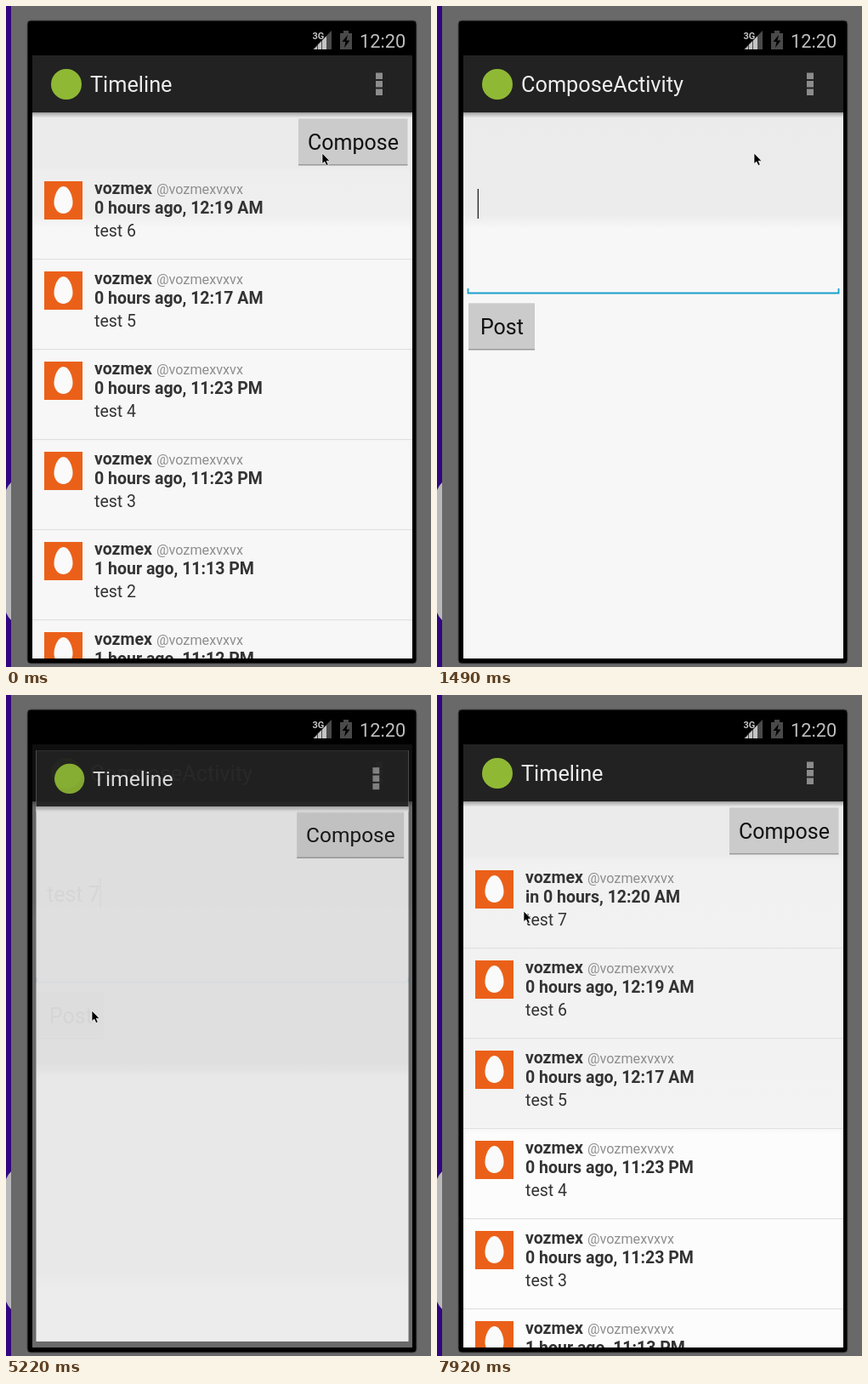
Recreate the animation shown at these times as an HTML page. Size 500x777 px, loop 8 s.

```html
<!DOCTYPE html>
<html lang="en">
<head>
<meta charset="utf-8">
<title>Timeline</title>
<style>
html, body { margin: 0; width: 100%; height: 100%; overflow: hidden; background: #696969; }
svg { display: block; width: 100%; height: 100%; }
text { font-family: Roboto, "Open Sans", sans-serif; white-space: pre; }
.title { font-size: 25.3px; fill: #eee; }
.big { font-size: 25px; fill: #101010; }
.row { font-size: 19.5px; fill: #333; }
.bold { font-weight: 700; }
.handle { font-size: 16.2px; fill: #8e8e8e; }
</style>
</head>
<body>
<svg id="stage" viewBox="0 0 500 777"></svg>
<script>
const LOOP = 8000;
const MESSAGE = 'test 7';
const $ = id => document.getElementById(id);

const rect = (x, y, w, h, fill, extra = '') =>
  `<rect x="${x}" y="${y}" width="${w}" height="${h}" fill="${fill}" ${extra}/>`;
const text = (x, y, cls, str, extra = '') =>
  `<text x="${x}" y="${y}" class="${cls}" ${extra}>${str}</text>`;

// Screen background with colour stops placed at stage heights
function background(id, stops) {
  const marks = stops.map(([y, c]) => `<stop offset="${(y - 58) / 709}" stop-color="${c}"/>`).join('');
  return `<linearGradient id="${id}" gradientUnits="userSpaceOnUse" x1="0" y1="58" x2="0" y2="767">${marks}</linearGradient>`
    + rect(31, 58, 447, 709, `url(#${id})`);
}

const actionBar = title =>
  rect(31, 58, 447, 67.5, '#222') +
  rect(31, 125.5, 447, 6, 'url(#shadow)') +
  '<circle cx="71" cy="92" r="18" fill="#8fb935"/>' +
  text(99, 101, 'title', title) +
  [78.5, 88, 97.5].map(y => rect(435, y, 8, 7.5, '#8c8c8c')).join('');

const button = (x, y, w, label, tx) =>
  rect(x, y, w, 55, '#cbcbcb') +
  rect(x, y, w, 1, '#d8d8d8') +
  rect(x, y + 54, w, 1.5, '#999') +
  text(tx, y + 36.5, 'big', label);

function post(i, [when, n]) {
  const y = i * 106;
  return `<g transform="translate(0 ${y})">` +
    rect(45, 206, 45, 45, '#eb6019') +
    '<path d="M67.5 212C74 212 78.5 223 78.5 231A11 13 0 0 1 56.5 231C56.5 223 61 212 67.5 212Z" fill="#fafafa"/>' +
    text(104, 221, 'row bold', 'vozmex') +
    text(177, 221, 'handle', '@vozmexvxvx') +
    text(104, 243.5, 'row bold', when) +
    text(104, 270.5, 'row', 'test ' + n) +
    rect(31, 297, 447, 1.2, '#e0e0e0') + '</g>';
}

const posts = [
  ['in 0 hours, 12:20 AM', 7],
  ['0 hours ago, 12:19 AM', 6],
  ['0 hours ago, 12:17 AM', 5],
  ['0 hours ago, 11:23 PM', 4],
  ['0 hours ago, 11:23 PM', 3],
  ['1 hour ago, 11:13 PM', 2],
  ['1 hour ago, 11:12 PM', 1]
];
const list = from => posts.slice(from, from + 6).map((p, i) => post(i, p)).join('');
const timelineTop = actionBar('Timeline') + button(344, 132, 128.5, 'Compose', 355);
const dim = id => rect(31, 58, 447, 709, '#000', `id="${id}" opacity="0"`);

$('stage').innerHTML = `
<defs>
  <clipPath id="screen">${rect(31, 58, 447, 709, '#000')}</clipPath>
  <linearGradient id="shadow" x2="0" y2="1">
    <stop stop-color="#a8a8a8"/><stop offset="1" stop-color="#ebebeb"/>
  </linearGradient>
</defs>
${rect(0, 0, 500, 777, '#696969')}
${rect(0, 0, 6, 777, '#31067f')}
<path d="M6 560Q2 564 0 569V713Q2 718 6 722Z" fill="#b9b9bb"/>
${rect(25, 17, 458, 756, '#000', 'rx="4" stroke="#4c4c4c"')}
${text(416, 49, '', '12:20', 'font-size="21.8" fill="#bebebe"')}
${text(360.5, 39, 'bold', '3G', 'font-size="11" fill="#c4c4c4"')}
<path d="M383 29V51H361Z" fill="#4a4a4a"/>
<path d="M362 51L366 47V51ZM367 51V45.5L371 41.5V51ZM372 51V40.5L377 35.5V51Z" fill="#c4c4c4"/>
<path d="M393 32H397V29H403V32H407V51H393Z" fill="#4a4a4a"/>
<path d="M402 34L395.5 42H399.5L398 49L404.5 40.5H400.5Z" fill="#000"/>
<g clip-path="url(#screen)">
  <g id="home">
    ${background('homeBg', [[190, '#ebebeb'], [196, '#eee'], [245, '#efefef'], [262, '#f7f7f7']])}
    ${timelineTop}${list(1)}${dim('homeDim')}
  </g>
  <g id="compose">
    ${background('composeBg', [[131, '#ebebeb'], [245, '#ececec'], [262, '#f7f7f7']])}
    ${actionBar('ComposeActivity')}
    ${text(48, 242.5, 'big', '', 'id="typed"')}
    ${rect(48, 215, 1.3, 35, '#222', 'id="caret"')}
    <path d="M36.5 332V337.5H472.5V332" fill="none" stroke="#1b9fcb" stroke-width="1.8"/>
    ${button(37, 349, 78, 'Post', 51)}${dim('composeDim')}
  </g>
  <g id="feed">
    ${background('blankBg', [[131, '#ececec'], [433, '#ececec'], [450, '#f6f6f6'], [685, '#f6f6f6'], [705, '#fbfbfb']])}
    <g id="filled">
      ${background('feedBg', [[188, '#ebebeb'], [197, '#f1f1f1'], [505, '#f3f3f3'], [516, '#fcfcfc']])}
      ${list(0)}
      ${rect(469, 197, 4.5, 147, '#b0b0b0', 'id="scroll"')}
    </g>
    ${timelineTop}
  </g>
</g>
<path id="pointer" d="M0 0V12.5L2.8 10L5 14.5L7.2 13.5L5.2 9.2H9Z" stroke="#fff" stroke-width=".7"/>`;

// Each track holds [start time, values...]
const opening = [[0, 0], [150, .1], [300, .3], [450, .54], [600, .76], [750, .92], [900, 1]];
const closing = [[0, 0], [5070, .55], [5220, .9], [5370, .98], [5520, 1]];
const typing = [
  [0, 0, 1], [900, 0, 0], [1490, 0, 1], [1790, 1, 1], [1940, 2, 1], [2230, 3, 1], [2530, 4, 1],
  [2830, 5, 1], [3280, 5, 0], [3730, 6, 1], [4180, 6, 0], [4780, 6, 1]
];
const scrollbar = [[0, 1], [6420, .5], [6570, 0]];
const moves = [
  [0, 372, 173], [900, 373, 173], [4180, 338, 253], [4330, 212, 305], [4480, 172, 329],
  [4630, 126, 352], [4780, 108, 366], [4930, 101, 371], [7320, 90, 318], [7470, 80, 274],
  [7620, 128, 236], [7770, 193, 225], [7920, 102, 254]
];
const at = (track, t) => track.findLast(step => step[0] <= t).slice(1);

// A window fades in while growing from 80% to full size
function enter(id, p) {
  const s = .8 + .2 * p;
  $(id).setAttribute('opacity', p);
  $(id).setAttribute('transform', `translate(254.5 412.5) scale(${s}) translate(-254.5 -412.5)`);
}

function draw(t) {
  const [open] = at(opening, t), [close] = at(closing, t);
  const [count, caretOn] = at(typing, t);
  const [x, y] = at(moves, t);
  enter('compose', open);
  enter('feed', close);
  $('homeDim').setAttribute('opacity', .19 * open);
  $('composeDim').setAttribute('opacity', .63 * close);
  $('typed').textContent = MESSAGE.slice(0, count);
  $('caret').setAttribute('x', 47.7 + (count ? $('typed').getComputedTextLength() : 0));
  $('caret').setAttribute('opacity', caretOn);
  $('filled').setAttribute('opacity', t >= 5820 ? 1 : 0);
  $('scroll').setAttribute('opacity', at(scrollbar, t)[0]);
  $('pointer').setAttribute('transform', `translate(${x} ${y})`);
}

const start = performance.now();
function tick() {
  draw((performance.now() - start) % LOOP);
  requestAnimationFrame(tick);
}
tick();
</script>
</body>
</html>
```
